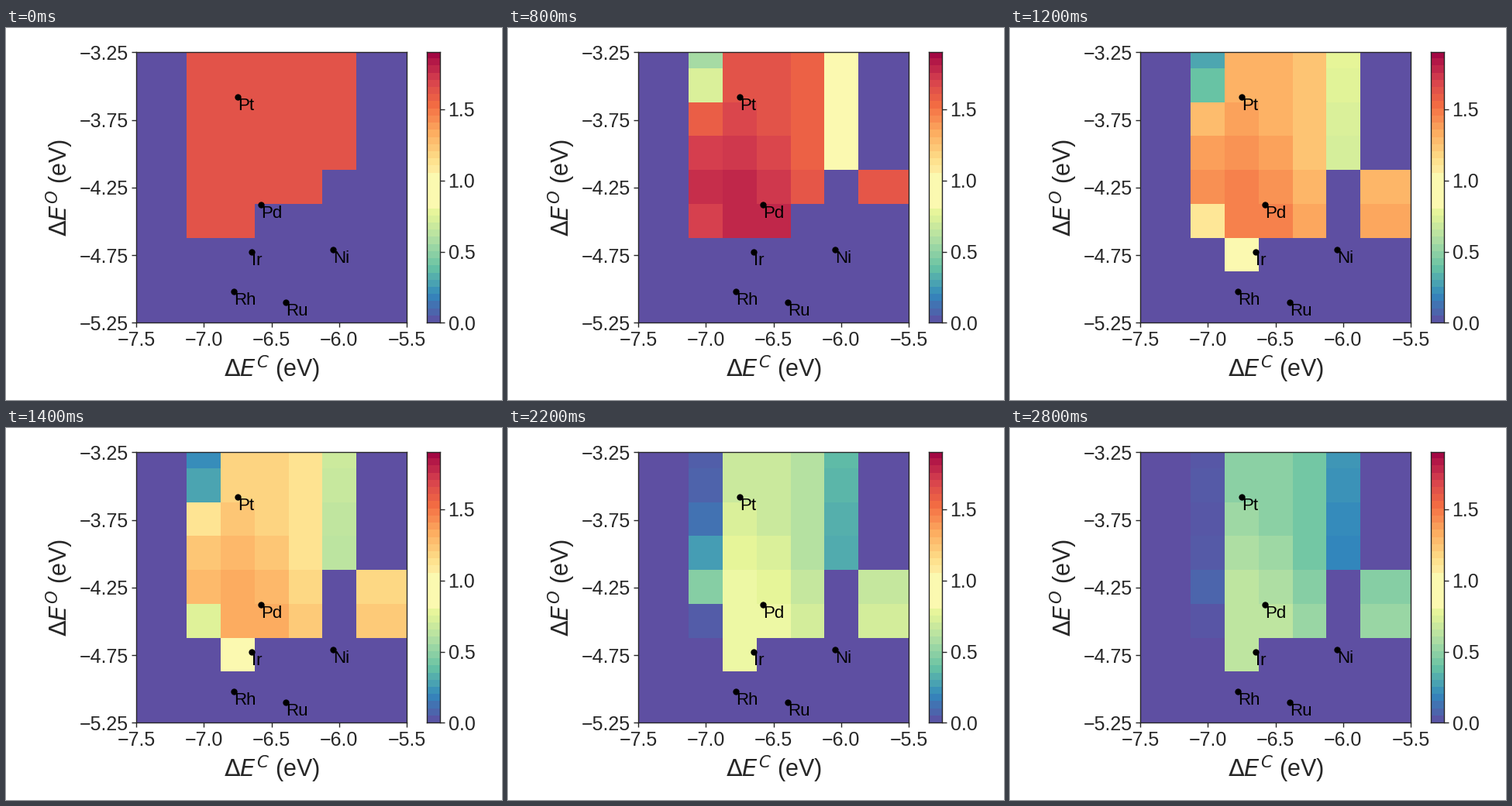
A matplotlib script for the animation above (3000 ms loop, 640 px wide and 480 px high).

```python
import matplotlib.pyplot as plt
import numpy as np
from matplotlib.animation import FuncAnimation

W, H, DPI = 640, 480, 100
BANDS = 38
OFF = -0.5       # band position of an inactive cell
START = 32       # uniform level at the beginning
PEAK = 36.2
DARK = "0.15"

plt.rcParams.update({
    "font.family": "Liberation Sans",
    "axes.edgecolor": DARK,
    "axes.labelcolor": DARK,
    "axes.labelsize": 22,
    "axes.linewidth": 1.0,
})
for side in ("xtick", "ytick"):
    plt.rcParams.update({f"{side}.color": DARK, f"{side}.labelsize": 18,
                         f"{side}.major.width": 1.0,
                         f"{side}.major.size": 4.0})

cmap = plt.get_cmap("Spectral_r")
PALE = np.array([251, 249, 176]) / 255


def shade(v):
    """Colour of band positions; the middle bands share one pale yellow."""
    rgb = cmap((np.asarray(v, float) + 0.5) / BANDS)[..., :3]
    rgb[(v >= 16) & (v < 21)] = PALE
    return rgb


def base(n):
    """Overall activity, falling steadily."""
    return np.interp(n, [2, 4, 6, 9, 11, 14], [37.5, 32, 25.7, 18.2, 12.9, 9.2])


def left_edge(n, row):
    """Column that fades out early, upper rows first."""
    bias = np.interp(row, [0, 1, 2, 4, 5], [-2.3, -1.9, 0.2, 2.6, -1.3])
    pull = 0.9 * (8.7 - n) * (0.35 if row < 2 else 1)
    return 1.1 * base(n) / (1 + np.exp(-min(bias + pull, row)))


def right_dip(n, row):
    """Column that peaks briefly at a middle level."""
    level = np.interp(n, [2, 4, 6, 9, 11, 14], [14.3, 18, 14.2, 9.2, 6.2, 3.8])
    return level + 0.6 * (row - 1.5) * np.clip((4 - n) / 2, -0.6, 1)


def plateau(n, row, col):
    """Central area, rising towards the lower left."""
    shift = max(4 - col, -1)
    lift = np.clip(row + shift - 2, 0, 3) - (1.3 if col > 4 else 0)
    value = base(n) + lift
    return min(value, 19) if row == 6 else value


def active_rows(n, col):
    late = int(n >= 6)
    if col < 2:
        return range(0)
    if col >= 7:
        return range(4, 4 + int(n >= 1) + late)
    depth = {2: 6, 3: 6 + late, 4: 5 + int(n >= 1), 5: 5 + late, 6: 4}
    return range(depth[col])


def cells_at(frame):
    n = max(frame, 2)
    grid = np.full((9, 9), OFF)
    for col in range(9):
        for row in active_rows(frame, col):
            if col == 2:
                v = left_edge(n, row)
            elif col == 6:
                v = right_dip(n, row)
            else:
                v = plateau(n, row, col)
            v = min(v, PEAK)
            grid[row, col] = START + (v - START) * min(frame / 2, 1)
    return grid


fig = plt.figure(figsize=(W / DPI, H / DPI), dpi=DPI, facecolor="white")


def add_axes(left, right, top=31.2, bottom=380.4):
    return fig.add_axes([left / W, 1 - bottom / H,
                         (right - left) / W, (bottom - top) / H])


ax = add_axes(168.2, 517.2)
image = ax.imshow(shade(cells_at(0)), extent=(-7.625, -5.375, -5.375, -3.125),
                  interpolation="nearest", aspect="auto")
ax.set_xlim(-7.5, -5.5)
ax.set_ylim(-5.25, -3.25)
ax.set_xticks(np.arange(-7.5, -5.4, 0.5))
ax.set_yticks(np.arange(-5.25, -3.2, 0.5))
ax.xaxis.set_major_formatter("{x:.1f}")
ax.yaxis.set_major_formatter("{x:.2f}")
ax.set_xlabel(r"$\Delta E^C$ (eV)")
ax.set_ylabel(r"$\Delta E^O$ (eV)")

metals = [("Pt", -6.751, -3.581), ("Pd", -6.579, -4.378),
          ("Ir", -6.647, -4.727), ("Ni", -6.046, -4.710),
          ("Rh", -6.779, -5.020), ("Ru", -6.395, -5.100)]
for name, x, y in metals:
    ax.plot(x, y, "o", color="black", markersize=6, markeredgewidth=0)
    ax.text(x, y - 0.007, name, color="black", fontsize=16,
            ha="left", va="top")

bar = add_axes(543.2, 560.2)
bar.imshow(shade(np.arange(BANDS)[:, None]), extent=(0, 1, 0, 1.9),
           origin="lower", interpolation="nearest", aspect="auto")
bar.set_xticks([])
bar.set_yticks([0, 0.5, 1, 1.5])
bar.yaxis.set_major_formatter("{x:.1f}")
bar.yaxis.tick_right()


def update(frame):
    image.set_data(shade(cells_at(frame)))
    return [image]


anim = FuncAnimation(fig, update, frames=15, interval=200,
                     repeat=True, repeat_delay=0, blit=False)
plt.show()
```
